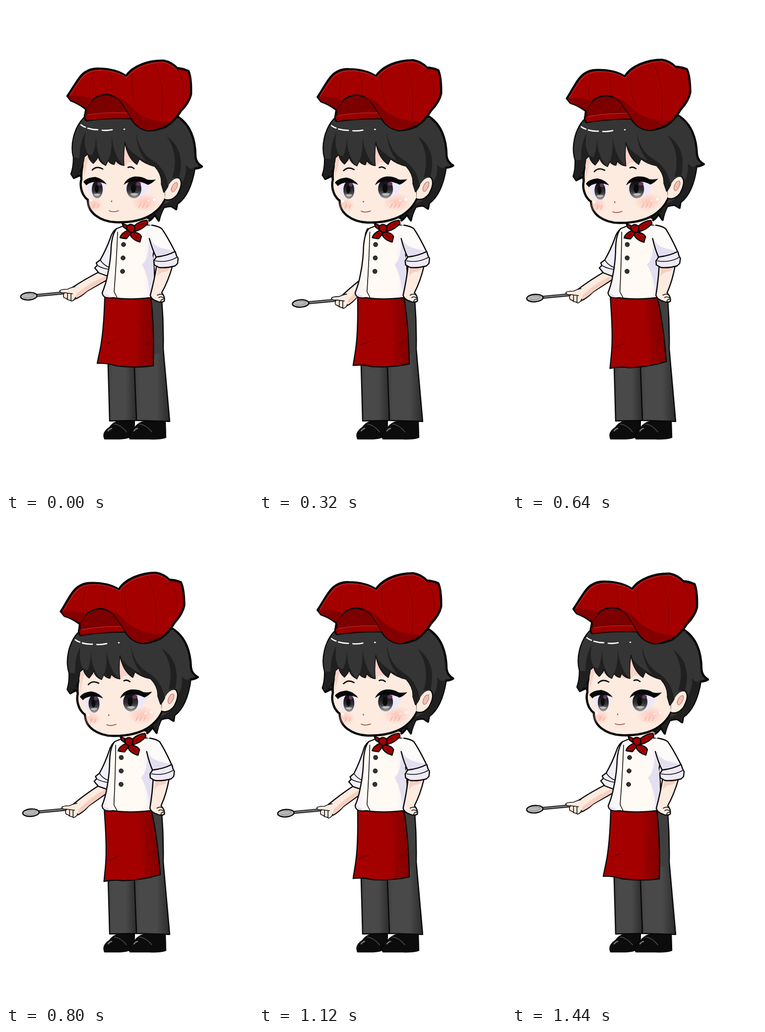
An HTML page for the animation above (1.48 s loop, 498 px wide and 976 px high).

```html
<!DOCTYPE html>
<html lang="en">
<head>
<meta charset="utf-8">
<title>Chef</title>
<style>
html, body { margin: 0; width: 100%; height: 100%; overflow: hidden; background: #fff }
svg { display: block; width: 100%; height: 100% }
path, ellipse, circle { stroke-linejoin: round; stroke-linecap: round }
.ink { stroke: #080808; stroke-width: 2.4 }
.bold { stroke: #080808; stroke-width: 4.5 }
.line { fill: none; stroke: #111; stroke-width: 1.6 }
.red { fill: #a50000 }
.dark { fill: #7d0000 }
.skin { fill: #fdebdf }
.shade { fill: #e4dff0 }
.hair { fill: #353535 }
.lock { fill: #202020 }
.seam { fill: none; stroke: #780000; stroke-width: 1 }
.blush { fill: none; stroke: #f3a99f; stroke-width: 1.4 }
.shine { fill: none; stroke: #fff; stroke-width: 2.6 }
</style>
</head>
<body>
<svg viewBox="0 0 498 976">
<defs>
  <linearGradient id="iris" x2="0" y2="1">
    <stop offset=".2" stop-color="#161418"/><stop offset=".6" stop-color="#353535"/><stop offset="1" stop-color="#999"/>
  </linearGradient>
  <radialGradient id="cheek"><stop stop-color="#ffb9af" stop-opacity=".75"/><stop offset="1" stop-color="#ffb9af" stop-opacity="0"/></radialGradient>
  <linearGradient id="cloth"><stop offset=".66" stop-color="#a50000"/><stop offset=".82" stop-color="#930000"/><stop offset="1" stop-color="#850000"/></linearGradient>
  <linearGradient id="leg"><stop stop-color="#3c3c3c"/><stop offset=".2" stop-color="#494949"/><stop offset=".65" stop-color="#494949"/><stop offset="1" stop-color="#2b2b2b"/></linearGradient>
  <linearGradient id="coatFill"><stop stop-color="#f1eef9"/><stop offset=".2" stop-color="#fffaf4"/><stop offset=".75" stop-color="#fffaf4"/><stop offset="1" stop-color="#ebe6f4"/></linearGradient>
</defs>

<g id="legs">
  <path class="ink" fill="#0c0c0c" d="M198 868Q195 857 209 848Q219 834 236 835H259L258 861Q250 871 225 871H199Z"/>
  <path class="ink" fill="#0c0c0c" d="M248 867Q248 856 260 848Q270 835 290 835H321L322 868Q310 872 290 871H250Z"/>
  <path fill="none" stroke="#4a4a4a" stroke-width="1.6" d="M218 841Q232 843 243 857M269 841Q283 843 294 857"/>
  <path fill="none" stroke="#777" stroke-width="2.5" d="M206 855Q209 851 213 850M258 855Q261 851 265 850"/>
  <path fill="url(#leg)" class="ink" d="M255 590H314Q318 640 317 690L330 836L263 834L258 727Z"/>
  <path fill="url(#leg)" class="ink" d="M202 590H259V727L263 834L209 835L206 727Z"/>
  <path fill="#3f3f3f" d="M294 594H313L316 700H297Z"/>
</g>

<g id="apron">
  <path fill="url(#cloth)" class="ink" d="M200 570L199 590Q197 655 190 690L184 719Q203 718 222 724Q262 729 297 724Q299 650 293 595L290 570Z"/>
  <path class="dark" d="M191 684Q206 674 224 672Q211 679 197 681ZM273 682Q288 677 297 668V680Q285 682 273 682Z"/>
  <path class="seam" d="M276 640Q278 690 268 724"/>
</g>

<g id="arm">
  <g id="forearm">
    <path class="skin ink" d="M222 520L190 534Q160 549 133 567L138 590Q150 586 163 574L215 545Z"/>
    <path fill="#f7cfc1" d="M205 542Q172 554 142 579L140 588Q151 584 164 573L210 546Z"/>
    <g id="hand">
      <path fill="none" stroke="#111" stroke-width="6" d="M56 583L120 577"/>
      <path fill="none" stroke="#777" stroke-width="3" d="M56 583L118 577"/>
      <ellipse class="ink" fill="#b7b7b7" cx="46" cy="584" rx="16.5" ry="7.5" transform="rotate(-4 46 584)"/>
      <path fill="none" stroke="#888" d="M36 587Q52 590 57 581Q50 578 43 580"/>
      <path class="skin" d="M141 567H126V588L140 590Z"/>
      <path class="skin line" d="M139 565Q129 567 124 570Q109 570 108 574Q111 578 118 577Q114 582 117 587Q122 588 124 591Q130 592 132 594Q139 592 140 586"/>
      <path class="line" d="M118 577L134 579M124 579V590M131 580V593"/>
    </g>
  </g>
  <path class="ink" fill="#f1eff9" d="M223 448Q214 454 210 468Q202 490 190 511L182 517L184 522L179 527L187 537L203 543L216 546L226 500Z"/>
  <path class="line" d="M190 511Q196 521 208 526M184 522Q194 528 207 530"/>
</g>

<g id="coat">
  <path class="skin" d="M244 425H286V446H250Z"/>
  <path fill="url(#coatFill)" class="ink" d="M223 448L238 442L252 450L284 440L306 447L296 505L299 530L300 580Q299 587 291 587Q245 592 216 587Q195 590 194 577Q201 560 204 545Q211 515 212 485Q214 459 223 448Z"/>
  <path class="shade" d="M288 470L297 508L298 532L299 585L289 586Q290 550 274 520Q288 510 288 470ZM196 578Q209 583 211 586Q198 588 196 578Z"/>
  <path class="line" d="M225 455Q223 510 218 575L224 587"/>
  <g id="buttons" fill="#333" stroke="#0c0c0c"><circle cx="237" cy="480" r="4.3"/><circle cx="236" cy="507" r="4.3"/><circle cx="235" cy="534" r="4.3"/></g>
</g>

<g id="hip">
  <path class="skin ink" d="M304 520Q300 548 291 582Q292 590 304 594Q313 598 319 594Q321 585 314 577Q327 554 336 522Z"/>
  <path fill="#f7cfc1" d="M307 526L333 524Q329 534 319 535Q311 535 304 545Z"/>
  <path class="line" d="M305 582Q313 577 318 583M308 587Q312 583 319 588M312 595Q312 590 318 590"/>
</g>
<g id="sleeve">
  <path fill="#fdfafa" d="M284 442Q304 440 314 448Q326 465 342 497L303 508Q291 485 287 462Z"/>
  <path class="shade" d="M288 465Q298 485 322 489L341 494V498L303 508Z"/>
  <path class="ink" fill="none" d="M294 441Q307 443 314 448Q326 465 342 497M289 468Q295 490 303 506"/>
  <path class="ink" fill="#eeebf6" d="M303 505Q324 503 341 494L344 503L347 508L346 518L341 523Q322 528 308 526L299 521L298 513Z"/>
  <path class="line" d="M301 513Q325 517 344 506"/>
</g>

<g id="scarf" class="red ink">
  <path d="M234 437L248 443L247 452L237 445ZM258 443Q270 432 284 431L286 437Q277 449 259 454Z"/>
  <path d="M246 451Q232 457 230 466Q238 468 243 468Q249 461 253 454ZM253 454Q270 456 273 464L270 475Q255 471 250 460Z"/>
  <path d="M243 445Q250 435 259 443Q262 453 253 456Q245 454 243 445Z"/>
  <path fill="none" stroke="#5c0000" stroke-width="1.3" d="M265 445L278 437M240 462L246 456M265 467L258 459"/>
</g>

<g id="head">
  <path class="hair bold" d="M157 226C138 246 130 280 137 305Q137 325 132 338L137 346L150 340L165 380L290 428L289 432Q296 427 300 420L308 432Q310 420 318 405Q328 402 334 403L343 409L345 398Q371 380 380 327Q388 327 395 323Q383 316 382 303Q382 245 345 222Z"/>
  <path class="lock" d="M380 327Q371 380 345 398L342 408L334 402Q322 402 318 405L308 430L301 418L288 431L300 402Q340 402 352 360Q366 340 362 318Q372 335 384 322Z"/>
  <path class="skin bold" stroke-width="4" d="M156 315Q151 330 152 348Q148 362 155 378Q160 387 165 390Q165 409 180 421Q197 434 220 435Q262 437 290 422Q315 406 321 385L320 300Z"/>
  <path class="skin" d="M158 300H318L320 386Q310 408 288 420Q260 434 220 432Q198 431 182 419Q168 405 167 388Q158 382 155 362Z"/>
  <path class="skin ink" d="M321 366Q337 342 349 346Q359 356 345 380Q333 394 320 389"/>
  <path fill="#f4c0b3" stroke="#a56a60" d="M333 369Q336 355 345 355Q348 362 340 372Q334 378 333 369Z"/>
  <ellipse fill="url(#cheek)" cx="178" cy="399" rx="18" ry="15"/>
  <ellipse fill="url(#cheek)" cx="280" cy="395" rx="29" ry="19"/>
  <path class="blush" d="M179 399L176 406M187 399L184 406M271 399L267 406M279 399L275 406M287 399L283 406"/>
  <circle cx="171" cy="391" r="2.6" fill="#fff"/><circle cx="299" cy="390" r="2.6" fill="#fff"/>
  <circle cx="287" cy="392" r="1.6" fill="#fff"/>
  <path fill="#f9d3c8" d="M156 310L166 298L240 272L258 312L280 320Q240 309 244 320L236 322L166 308L157 345Z"/>

  <path fill="#ede7fc" d="M163 357Q180 347 199 359Q200 377 190 386H176Q165 380 163 357ZM240 359Q262 347 290 356Q288 377 268 386H250Q240 378 240 359Z"/>
  <ellipse fill="url(#iris)" cx="184" cy="369" rx="11" ry="18"/>
  <ellipse fill="url(#iris)" cx="258" cy="368" rx="15" ry="19"/>
  <ellipse fill="#0a0a0a" cx="183" cy="368" rx="4" ry="8"/><ellipse fill="#0a0a0a" cx="257" cy="367" rx="5" ry="9"/>
  <ellipse fill="#64365f" cx="188" cy="358" rx="4" ry="4"/><ellipse fill="#64365f" cx="267" cy="358" rx="5" ry="4"/>
  <path fill="#bbb" d="M176 379Q184 376 191 379Q184 386 176 379ZM250 378Q259 375 267 378Q259 386 250 378Z"/>
  <path fill="#080808" d="M156 354Q162 345 180 344Q195 347 203 359Q190 353 178 354Q166 356 162 361ZM237 360Q243 345 261 343Q276 343 284 349Q292 351 302 349Q295 357 286 360Q274 353 260 353Q247 352 237 360Z"/>
  <path fill="none" stroke="#080808" stroke-width="2.6" d="M174 330Q183 321 195 328M246 325Q252 322 258 327"/>
  <ellipse fill="#8c4a42" cx="213" cy="393" rx="1.2" ry="1.7"/>
  <path fill="none" stroke="#a8423f" stroke-width="1.6" d="M208 412Q216 416 227 412"/>

  <path class="hair" d="M157 226C138 246 130 280 137 305Q137 325 132 338L137 346Q154 334 158 304L165 298Q166 309 176 317Q183 310 186 303Q188 315 201 321L206 311Q210 318 218 319L221 311Q228 320 238 321Q236 298 240 274Q244 305 264 319L269 308Q280 318 300 323Q315 340 313 358L318 375Q322 372 327 362Q336 346 348 345L364 320L350 226Z"/>
  <path class="lock" d="M137 305Q137 325 132 338L137 346Q154 334 158 304L165 298Q155 280 161 252Q148 275 148 306ZM165 298Q166 309 176 317L186 303Q188 315 201 321Q181 300 182 264Q179 292 173 301ZM206 311Q210 318 218 319L221 311Q228 320 238 321Q218 305 213 262Q214 294 206 311ZM240 274Q244 305 264 319L269 308Q280 318 300 323Q315 340 313 358L318 375Q322 372 327 362Q321 325 292 308Q268 292 262 254Q264 290 282 312Q248 295 240 274ZM324 262Q350 300 335 346L349 344Q363 290 324 262Z"/>
  <path class="line" d="M132 338L137 346Q154 334 158 304L165 298Q166 309 176 317Q183 310 186 303Q188 315 201 321L206 311Q210 318 218 319L221 311Q228 320 238 321Q236 298 240 274Q244 305 264 319L269 308Q280 318 300 323Q315 340 313 358L318 375Q322 372 327 362"/>
  <path class="shine" d="M151 239Q156 243 160 244M165 246Q175 249 185 249M194 250Q204 251 214 249M238 248H239"/>

  <path class="dark bold" d="M162 205L160 217Q157 226 162 230Q200 224 258 226L240 180H180Z"/>
  <path class="red bold" d="M124 181C136 164 148 140 160 133Q172 125 188 126Q222 127 242 141C256 120 288 109 318 110Q334 113 345 125Q358 126 368 131Q374 145 373 178Q369 195 352 212Q340 232 322 243Q300 252 284 250Q266 246 255 230Q244 212 232 194Q220 180 202 179Q182 181 174 191Q164 200 161 207Q146 195 131 190Z"/>
  <path class="dark" d="M174 192Q183 181 203 179Q221 181 232 195L248 219Q205 208 164 215L162 207Z"/>
  <path fill="#970000" stroke="#500000" d="M160 219Q200 211 249 214L256 226Q205 225 163 230Q159 226 160 219Z"/>
  <path fill="none" stroke="#c52020" stroke-width="1.6" d="M165 219Q200 213 245 215M129 179C140 163 150 144 163 136Q174 129 190 129Q222 130 243 144C260 123 290 113 318 113Q333 117 344 128"/>
  <path fill="#840000" d="M125 182Q147 177 176 188L162 206Q146 195 131 190ZM213 181Q237 183 254 205Q281 233 333 234Q300 252 284 250Q266 246 255 230Q244 212 232 194Z"/>
  <path class="line" d="M174 191Q182 181 203 179Q225 183 233 195L255 230"/>
  <path class="seam" d="M178 133Q166 155 169 184M208 131Q216 155 213 179M256 134Q249 165 263 205M300 117Q323 160 313 236M345 128Q365 155 357 200M140 167Q135 175 141 185"/>
</g>
</svg>
<script>
const STEP = 40, LOOP = 1480, SWING = 1440, STIR = 640;
const set = (id, transform) => document.getElementById(id).setAttribute('transform', transform);
const turn = (angle, x, y) => `rotate(${angle} ${x} ${y})`;
const ease = u => (1 - Math.cos(Math.PI * u)) / 2;
// Horizontal shear: dx1 at height y1, dx2 at height y2
const shear = (id, y1, dx1, y2, dx2) => {
  const k = (dx2 - dx1) / (y2 - y1);
  set(id, `matrix(1 0 ${k} 1 ${dx1 - k * y1} 0)`);
};

// Smaller second stroke of the arm, with a slight overshoot
function flick(t) {
  if (t < STIR) return 0;
  if (t < 1020) return ease((t - STIR) / 380);
  if (t < 1360) return 1 - 1.25 * ease((t - 1020) / 340);
  return -.25 * (1 - ease((t - 1360) / 80));
}

function draw(now) {
  const t = Math.floor(now % LOOP / STEP) * STEP;
  const sway = ease(2 * t / SWING);
  const stir = t < STIR ? ease(2 * t / STIR) : 0;
  const dip = flick(t);

  const upper = -22 * stir - 3.5 * dip;
  const lower = -8 * stir - 6.5 * dip - 3.5 * sway;
  set('arm', `translate(${-3 * sway} 0) ${turn(upper, 222, 455)}`);
  set('forearm', turn(lower - upper, 195, 530));
  set('hand', turn(-lower, 130, 580));

  set('head', turn(-2.13 * sway, 260, 553));
  set('scarf', `translate(${-4 * sway} ${sway / 2})`);
  set('buttons', `translate(${-1.5 * sway} 0)`);
  shear('coat', 590, 0, 446, -4.2 * sway);
  shear('hip', 590, 0, 515, -8 * sway);
  shear('sleeve', 515, -8 * sway, 447, -4.5 * sway);

  const a = .109 * sway, b = -.17 * sway;
  set('apron', `translate(246 590) matrix(1 ${b} ${a} 1 0 0) translate(-246 -590)`);
  requestAnimationFrame(draw);
}
draw(0);
</script>
</body>
</html>
```
